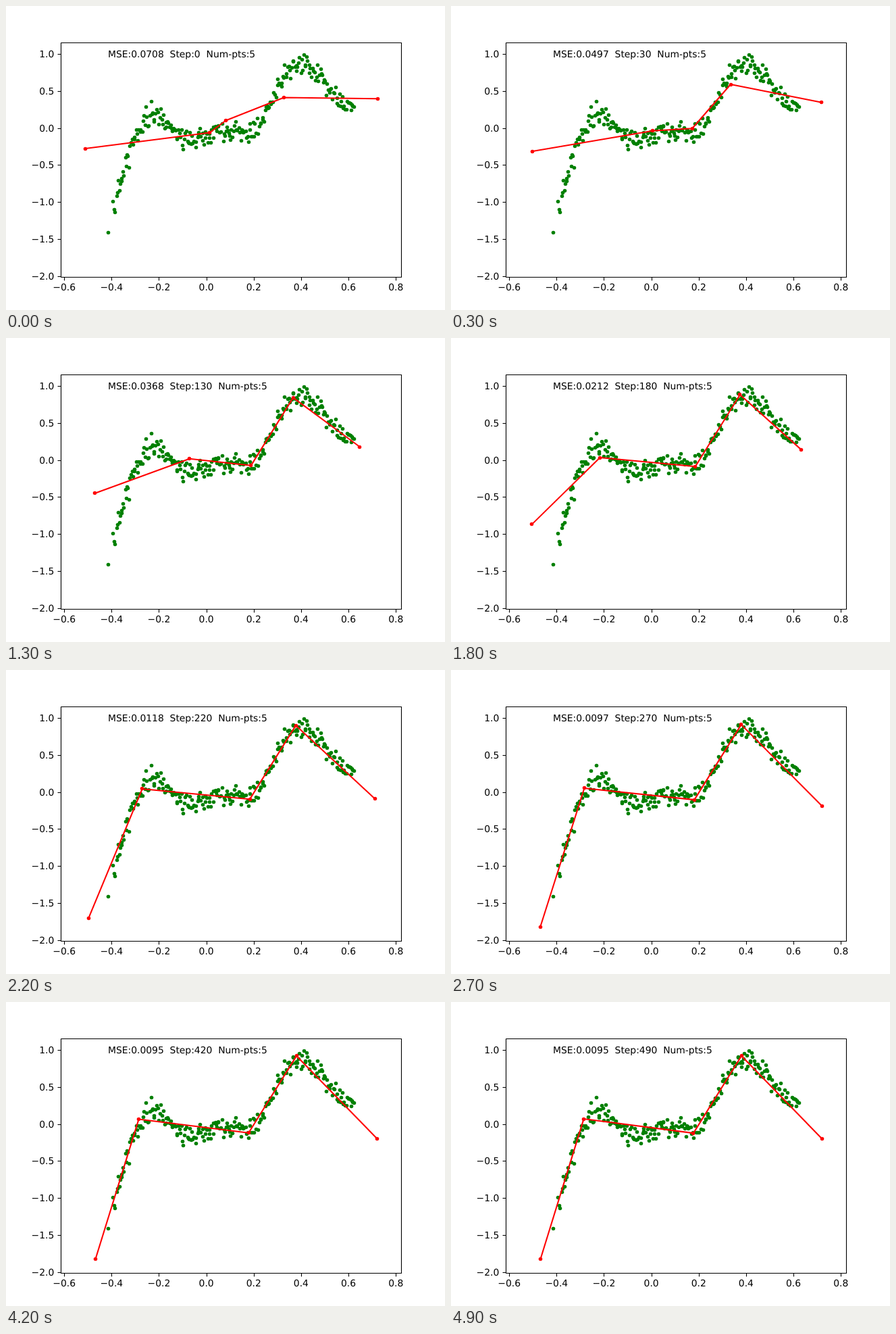
An HTML page with a canvas for the animation above (5 s loop, 650 by 450 pixels).

```html
<!DOCTYPE html>
<html lang="en">
<head>
<meta charset="utf-8">
<title>Piecewise linear fit</title>
<style>
html, body { margin: 0; width: 100%; height: 100%; overflow: hidden; background: #fff; }
canvas { display: block; }
</style>
</head>
<body>
<canvas id="plot" width="650" height="450"></canvas>
<script>
const ctx = document.getElementById('plot').getContext('2d');
const FRAME = 100, COUNT = 50;
const BOX = { left: 81.5, top: 54.5, right: 585.5, bottom: 401.5 };
const GREEN = '#008000', RED = '#f00', BLACK = '#000';

const toX = x => 296.6 + x * 350.75;
const toY = y => 180.6 - y * 109.6;
const snap = v => Math.round(v) + .5;

// Turning points of the sampled curve, in data units
const TURNS = [
  [-.414, -1.41], [-.22, .2], [-.07, -.16], [.1, -.02],
  [.18, -.05], [.39, .87], [.62, .27]
];

function curve(x) {
  let i = 1;
  while (i < TURNS.length - 1 && TURNS[i][0] < x) i++;
  const [x0, y0] = TURNS[i - 1], [x1, y1] = TURNS[i];
  const u = (x - x0) / (x1 - x0);
  const ease = i === 1 ? Math.sin(u * Math.PI / 2) : (1 - Math.cos(u * Math.PI)) / 2;
  return y0 + (y1 - y0) * ease;
}

function makeRandom(seed) {
  return () => {
    seed = (seed * 1664525 + 1013904223) >>> 0;
    return seed / 4294967296;
  };
}

function makeCloud(n) {
  const random = makeRandom(41), cloud = [[toX(-.414), toY(-1.41)]];
  for (let i = 0; i < n; i++) {
    const x = -.395 + 1.02 * (i + random()) / n;
    const noise = (random() + random() - 1) * .18;
    cloud.push([toX(x), toY(curve(x) + noise)]);
  }
  return cloud;
}

// Motion rules, time in ms
const decay = (t, tau) => Math.exp(-t / tau);
const rise = (t, mid, width) => 1 / (1 + Math.exp((mid - t) / width));
const bump = (t, mid, width) => Math.exp(-(((t - mid) / width) ** 2) / 2);
const ramp = t => Math.min(t / 1300, 1);

function jointsAt(t) {
  const fast = decay(t, 200);
  return [
    [117 + 15 * ramp(t) - 15.5 * bump(t, 1970, 260),
     210.5 + 17.5 * ramp(t) + 152 * rise(t, 1900, 125)],
    [292 + 9 * decay(t, 900) - 96 * rise(t, 1550, 215),
     172 + 15 * decay(t, 1500)],
    [358 + 10 * decay(t, 1600) - 43 * fast,
     194.5 - 13 * decay(t, 1800) - 12.5 * fast],
    [429.6 - 18.6 * Math.exp(-((t / 1080) ** 1.5)),
     79.2 + 55.8 * decay(t, 700)],
    [550.6 - 34 * bump(t, 1720, t < 1720 ? 600 : 230) - 2 * t / 4900,
     136.7 + 24 * ramp(t) + 41 * rise(t, 2080, 125)]
  ];
}

function errorAt(t) {
  return .00946 + .0305 * decay(t, 257) + .0308 * (1 - rise(t, 1702, 200));
}

function dots(points, color) {
  ctx.fillStyle = color;
  for (const [x, y] of points) {
    ctx.beginPath();
    ctx.arc(snap(x), snap(y), 2.78, 0, 2 * Math.PI);
    ctx.fill();
  }
}

function line(points, color, width) {
  ctx.strokeStyle = color;
  ctx.lineWidth = width;
  ctx.lineJoin = 'round';
  ctx.beginPath();
  points.forEach(([x, y]) => ctx.lineTo(x, y));
  ctx.stroke();
}

function label(text, x, y, align) {
  ctx.fillStyle = BLACK;
  ctx.textAlign = align;
  ctx.fillText(text, x, y);
}

function axes() {
  const { left, top, right, bottom } = BOX;
  const name = v => v.toFixed(1).replace('-', '\u2212');
  ctx.strokeStyle = BLACK;
  ctx.lineWidth = 1.11;
  ctx.strokeRect(left, top, right - left, bottom - top);
  for (let k = -3; k <= 4; k++) {
    const x = toX(k / 5);
    line([[snap(x), bottom], [snap(x), bottom + 5]], BLACK, 1.11);
    label(name(k / 5), x, 421, 'center');
  }
  for (let k = -4; k <= 2; k++) {
    const y = toY(k / 2);
    line([[left - 5, snap(y)], [left, snap(y)]], BLACK, 1.11);
    label(name(k / 2), 71.3, Math.round(y) + 5, 'right');
  }
}

const cloud = makeCloud(245);

function draw(now) {
  const i = Math.floor(now / FRAME) % COUNT, t = i * FRAME;
  const joints = jointsAt(t);
  ctx.fillStyle = '#fff';
  ctx.fillRect(0, 0, 650, 450);
  ctx.font = '13.89px "DejaVu Sans", sans-serif';
  ctx.textRendering = 'geometricPrecision';
  dots(cloud, GREEN);
  line(joints.map(([x, y]) => [x + .5, y + .5]), RED, 2.08);
  dots(joints, RED);
  axes();
  label(`MSE:${errorAt(t).toFixed(4)}  Step:${i * 10}  Num-pts:5`, 151, 76, 'left');
}

const start = performance.now();
function tick() {
  draw(performance.now() - start);
  requestAnimationFrame(tick);
}
tick();
</script>
</body>
</html>
```
